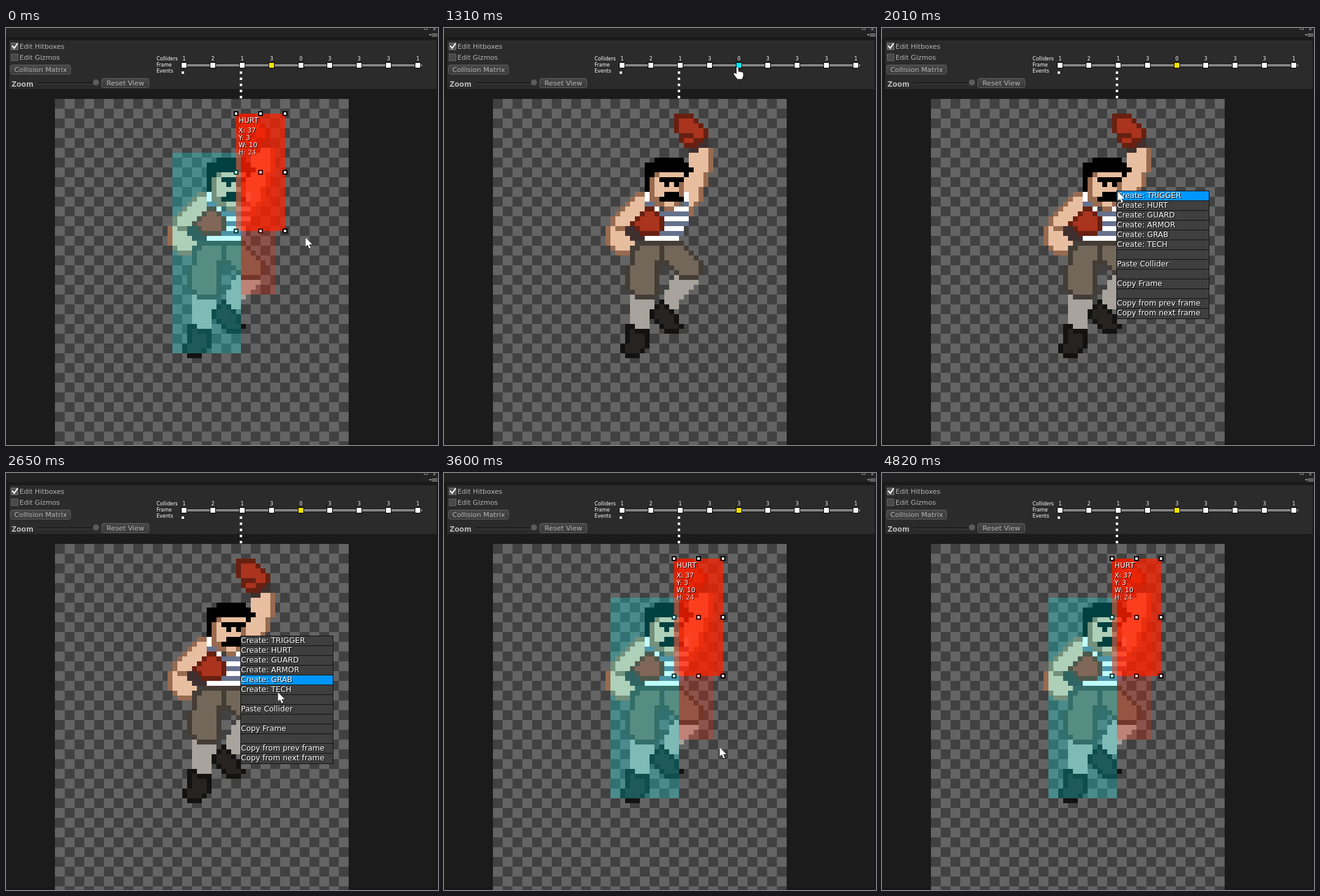
These frames come from a looping animation (706 by 682 pixels, 5.54 s). An HTML page with a canvas:

```html
<!DOCTYPE html>
<html lang="en">
<head>
<meta charset="utf-8">
<title>Hitbox editor</title>
<style>
html, body { margin: 0; width: 100%; height: 100%; overflow: hidden; background: #1b1b1b; }
canvas { display: block; }
</style>
</head>
<body>
<canvas id="stage" width="706" height="682"></canvas>
<script>
const LOOP = 5540, CELL = 8, LEFT = 80, TOP = 116;
const SELECT = 1250, MENU_OPEN = 1990, PASTE = 3560;
const ctx = document.getElementById('stage').getContext('2d');

function rect(x, y, w, h, color, g = ctx) {
  g.fillStyle = color;
  g.fillRect(x, y, w, h);
}
function frame(x, y, w, h, color) {
  ctx.strokeStyle = color;
  ctx.lineWidth = 1;
  ctx.strokeRect(x + .5, y + .5, w - 1, h - 1);
}
function text(str, x, y, size, color = '#fff', { bold = false, align = 'left', shadow = false } = {}) {
  ctx.font = `${bold ? 'bold ' : ''}${size}px "DejaVu Sans", sans-serif`;
  ctx.textAlign = align;
  if (shadow) {
    ctx.fillStyle = '#000';
    ctx.fillText(str, x + 1, y + 1);
  }
  ctx.fillStyle = color;
  ctx.fillText(str, x, y);
}
function layer(w, h, draw) {
  const c = document.createElement('canvas');
  c.width = w;
  c.height = h;
  draw(c.getContext('2d'));
  return c;
}

// Sprite parts in cell units: fill, path, optional colour for the rim cells.
const SKIN = '#e8bea0', SHADE = '#986b50', BAND = '#3f302f', BLACK = '#000';
const RED = '#aa341e', MAROON = '#682011', CLOTH = '#736759', HEM = '#443d36';
const SOCK = '#a8a39d', BOOT = '#272321', SOLE = '#131211';
const PARTS = [
  [SHADE, 'M40 11h2v-1h3v5h-1v3h-1v3h-1v1h-1v2h-1z'],
  [SKIN, 'M39 16h1v-5h2v-1h2v5h-1v3h-1v3h-1v1h-1v-3h-1z'],
  [RED, 'M37 3h4v1h1v1h1v1h1v2h-1v1h-1v1h-3v-1h-1v-2h-1z', MAROON],
  [MAROON, 'M39 7h2v1h1v1h-1v-1h-2z'],
  [BAND, 'M43 8h1v2h-2v1h-2v-1h2v-1h1z'],
  [SOCK, 'M37 36h5v2h-1v1h-1v1h-1v1h-1v2h-3v-4h1v-2h1z'],
  [SOCK, 'M28 40h5v5h-1v3h-4z'],
  [CLOTH, 'M34 29h5v1h1v1h1v1h1v1h1v3h-1v1h-4v-1h-1v-1h-1v-1h-2z', HEM],
  [CLOTH, 'M30 29h5v4h-1v7h-1v1h-4v-1h-1v-1h-1v-5h1v-4h2z', HEM],
  [BOOT, 'M34 41h1v1h1v1h1v1h1v2h1v1h-1v1h-3v-1h-1v-1h-1v-1h-1v-2h1v-1h1z', SOLE],
  [BOOT, 'M27 46h2v1h3v4h-1v1h-1v1h-3v-1h-1v-2h1z', SOLE],
  [SHADE, 'M33 15h6v6h-1v1h-1v1h-2v-1h-2v-1h-1v-5h1z'],
  [SKIN, 'M34 15h5v2h-1v4h-1v1h-2v-1h-1v-1h-1v-4h1z'],
  ['#fff', 'M31 19h1v2h1v1h1v1h3v-1h2v-3h1v7h-1v2h-1v1h-7z'],
  ['#66718c', 'M31 21h2v1h-2zM39 21h1v1h-1zM34 23h6v1h-6zM34 25h6v1h-6zM34 27h5v1h-5z'],
  [BLACK, 'M33 12h6v1h1v1h1v1h-1v1h-1v-1h-6v1h-1v3h-1v-6h2z'],
  [BLACK, 'M34 16h5v1h-1v1h-1v-1h-1v1h-1v-1h-1z'],
  [BLACK, 'M35 19h3v1h1v1h-5v-1h1z'],
  [SHADE, 'M29 19h2v5h-2v2h-2v2h1v1h1v1h-1v2h-3v-1h-1v-1h-1v-4h1v-2h1v-1h1v-1h1v-1h1v-1h1z'],
  [SKIN, 'M29 20h2v4h-2v1h-1v1h-3v-2h1v-1h1v-1h1v-1h1z'],
  [SKIN, 'M24 26h1v1h2v1h1v1h1v1h-1v1h-3v-1h-1z'],
  [RED, 'M31 22h2v1h1v1h1v3h-1v1h-4v-1h-1v-1h-1v-1h1v-1h1v-1h1z', MAROON],
  [BAND, 'M27 26h2v1h1v1h1v1h-3v-1h-1z'],
];

const sprite = layer(60, 71, g => {
  for (const [fill, d, rim = fill] of PARTS) {
    const path = new Path2D(d);
    const inside = (x, y) => g.isPointInPath(path, x + .5, y + .5);
    for (let y = 0; y < 71; y++) for (let x = 0; x < 60; x++) {
      if (!inside(x, y)) continue;
      const core = inside(x - 1, y) && inside(x + 1, y) && inside(x, y - 1) && inside(x, y + 1);
      rect(x, y, 1, 1, core ? fill : rim, g);
    }
  }
});

const checker = layer(480, 566, g => {
  for (let y = 0; y < 36; y++) for (let x = 0; x < 30; x++)
    rect(x * 16, y * 16, 16, 16, (x + y) % 2 ? '#646464' : '#414141', g);
});

// Pointer stops: time, x, y. Moves ease between them.
const STOPS = [
  [190, 489, 342], [690, 485, 57], [1000, 485, 57], [1050, 480, 64], [1470, 480, 64],
  [1780, 377, 256], [1970, 385, 267], [2510, 385, 267], [2650, 444, 358],
  [3060, 449, 444], [3090, 449, 444], [3190, 450, 448], [4440, 450, 448], [4820, 611, 690],
];
function pointer(t) {
  const i = STOPS.findIndex(s => s[0] > t);
  if (i === 0) return STOPS[0].slice(1);
  if (i < 0) return STOPS.at(-1).slice(1);
  const [t0, x0, y0] = STOPS[i - 1], [t1, x1, y1] = STOPS[i];
  const p = (t - t0) / (t1 - t0);
  const linear = t0 === 2510;
  const k = linear ? p : p * p * (3 - 2 * p);
  return [x0 + (x1 - x0) * k, y0 + (y1 - y0) * k];
}

const ARROW = new Path2D('M.5 .5v15l3.5-3 2.5 6 2.5-1-2.5-5.5h5z');
const HAND = new Path2D('M-2 1q1.500-2 3 0v6l6.500 1.500q1.500 .5 1.500 2v4l-2 5h-7.500l-6-8q0-2 2-2l2.500 2z');
function drawCursor(x, y, hand) {
  const shape = hand ? HAND : ARROW;
  ctx.save();
  ctx.translate(Math.round(x), Math.round(y));
  ctx.lineWidth = 1;
  ctx.strokeStyle = '#000';
  ctx.fillStyle = '#fff';
  ctx.stroke(shape);
  ctx.fill(shape);
  ctx.restore();
}

function button(label, x, y, w) {
  const g = ctx.createLinearGradient(0, y, 0, y + 16);
  g.addColorStop(0, '#484848');
  g.addColorStop(1, '#393939');
  ctx.beginPath();
  ctx.roundRect(x + .5, y + .5, w - 1, 15, 3);
  ctx.fillStyle = g;
  ctx.fill();
  ctx.lineWidth = 1;
  ctx.strokeStyle = '#606060';
  ctx.stroke();
  text(label, x + w / 2, y + 12, 11.25, '#b4b4b4', { align: 'center' });
}
function checkbox(label, y, on) {
  rect(8, y, 12, 12, on ? '#555' : '#484848');
  frame(8, y, 12, 12, on ? '#777' : '#666');
  if (on) {
    ctx.lineWidth = 2;
    ctx.strokeStyle = '#fff';
    ctx.stroke(new Path2D(`M10 ${y + 5}l3.500 4 5.500-8`));
  }
  text(label, 22, y + 10, 11.15, '#b4b4b4');
}

function drawWindow() {
  rect(0, 0, 706, 682, '#1b1b1b');
  rect(0, 0, 706, 16, '#222');
  rect(0, 15, 706, 1, '#171717');
  rect(4, 19, 700, 82, '#161616');
  rect(5, 20, 699, 80, '#2b2b2b');
  rect(0, 678, 706, 4, '#171717');
  rect(704, 16, 1, 666, '#141414');
  frame(683, -3, 6, 6, '#888');
  ctx.lineWidth = 1;
  ctx.strokeStyle = '#999';
  ctx.stroke(new Path2D('M698 0l4 4M702 0l-4 4M696 9.500h9M696 11.500h9M696 13.500h9'));
  ctx.fillStyle = '#999';
  ctx.fill(new Path2D('M691 10h5l-2.500 3z'));

  checkbox('Edit Hitboxes', 24, true);
  checkbox('Edit Gizmos', 42, false);
  button('Collision Matrix', 7, 60, 99);
  text('Zoom', 9, 96, 11.4, '#b4b4b4', { bold: true });
  rect(52, 89, 92, 3, '#191919');
  rect(52, 91, 92, 1, '#484848');
  ctx.beginPath();
  ctx.arc(147, 89, 5, 0, 7);
  ctx.fillStyle = '#5c5c5c';
  ctx.fill();
  button('Reset View', 156, 82, 78);
  text('Colliders', 246, 53, 8);
  text('Frame', 246, 63, 8);
  text('Events', 246, 73, 8);
}

function drawTimeline(selected, hovered, counts) {
  rect(288, 58, 392, 6, '#161616');
  rect(288, 59, 392, 4, '#858585');
  counts.forEach((n, i) => {
    const x = Math.floor(291 + i * 47.75);
    text(n, x, 53, 8, '#fff', { align: 'center' });
    rect(x - 5, 56, 10, 10, '#000');
    rect(x - 4, 57, 8, 8, i === hovered ? '#00f0ff' : i === selected ? '#ffe100' : '#fff');
  });
  rect(287, 71, 4, 4, '#fff');
  for (let y = 71; y < 116; y += 10) rect(382, y, 4, 4, '#fff');
}

function box(x, y, w, h, color) {
  rect(LEFT + x * CELL, TOP + y * CELL, w * CELL, h * CELL, color);
}
// The selected box lies below the other two, which tint it and its handles.
function drawColliders() {
  box(37, 3, 10, 24, 'rgba(255,32,0,.75)');
  for (const y of [140, 236, 332]) for (const x of [376, 416, 456]) {
    rect(x - 4, y - 4, 8, 8, '#000');
    rect(x - 2, y - 2, 4, 4, '#fff');
  }
  text('HURT', 380, 155, 12, '#fff', { shadow: true });
  ['X: 37', 'Y: 3', 'W: 10', 'H: 24'].forEach((s, i) =>
    text(s, 380, 171 + i * 12, 10.8, '#fff', { shadow: true }));
  box(24, 11, 14, 41, 'rgba(0,255,255,.25)');
  box(38, 10, 7, 30, 'rgba(255,32,0,.25)');
}

const MENU = [...['TRIGGER', 'HURT', 'GUARD', 'ARMOR', 'GRAB', 'TECH'].map(s => 'Create: ' + s),
  '', 'Paste Collider', '', 'Copy Frame', '', 'Copy from prev frame', 'Copy from next frame'];
function drawMenu(active) {
  rect(383, 266, 152, 210, '#111');
  MENU.forEach((label, i) => {
    const y = 267 + i * 16;
    rect(384, y, 150, i === 12 ? 16 : 15, label && i === active ? '#0096ff' : '#3f3f3f');
    text(label, 384, y + 11, 12.4, '#fff', { shadow: true });
  });
}

function render(t) {
  const [x, y] = pointer(t);
  const hover = t > 640 && y < 76;
  drawWindow();
  drawTimeline(t < SELECT ? 3 : 4, hover ? 4 : -1, [1, 2, 1, 3, t < PASTE ? 0 : 3, 3, 3, 3, 1]);
  ctx.imageSmoothingEnabled = false;
  ctx.drawImage(checker, LEFT, TOP);
  ctx.drawImage(sprite, LEFT, TOP, 60 * CELL, 71 * CELL);
  if (t < SELECT || t >= PASTE) drawColliders();
  if (t >= MENU_OPEN && t < PASTE) {
    const lagged = pointer(t - 40)[1];
    drawMenu(Math.floor((lagged - 266) / 16));
  }
  if (t < 4820) drawCursor(x, y, hover);
}

function tick() {
  render(performance.now() % LOOP);
  requestAnimationFrame(tick);
}
tick();
</script>
</body>
</html>
```
